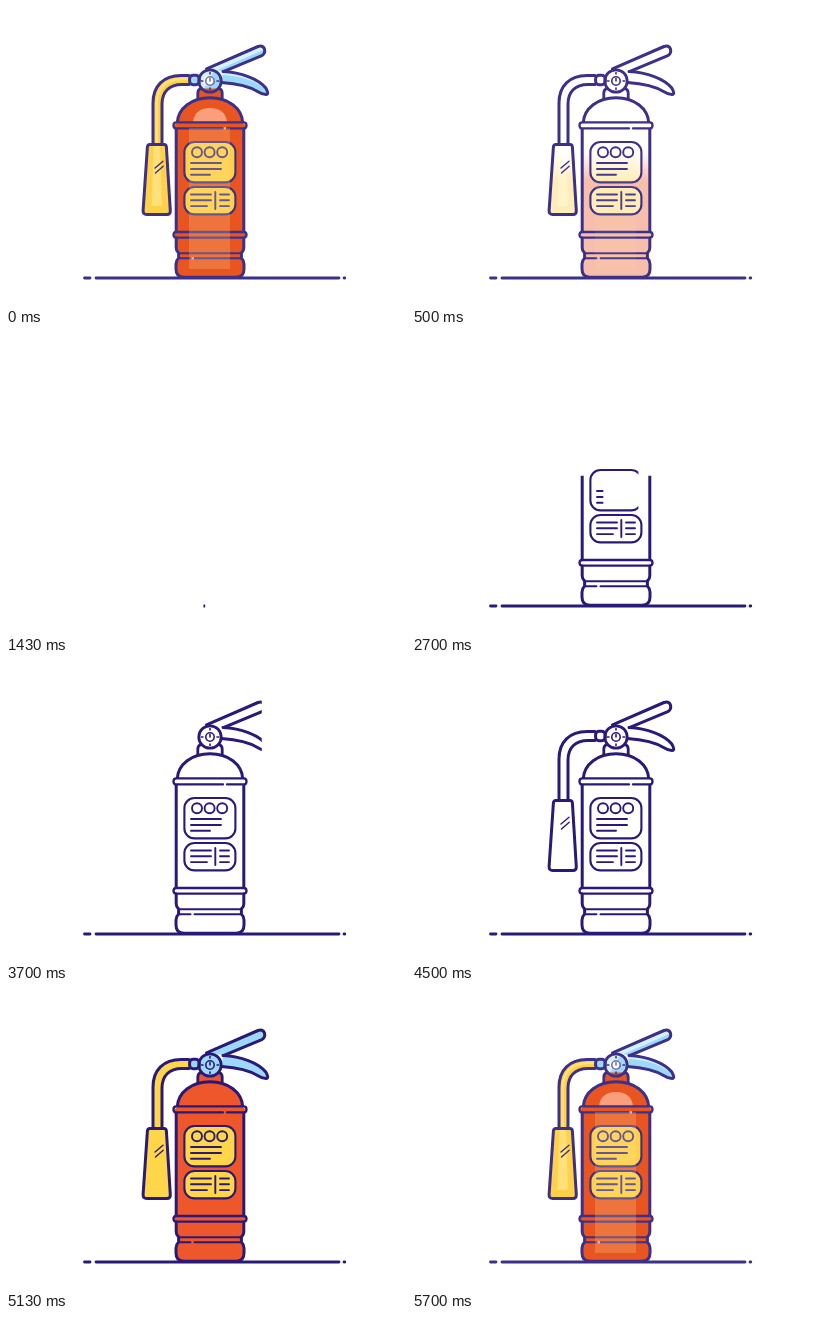
Write an HTML page with a canvas that moves like this. It is 400 by 300 pixels and loops after 7210 ms.

```html
<!DOCTYPE html>
<html lang="en">
<head>
<meta charset="utf-8">
<title>Fire extinguisher</title>
<style>
html, body { margin: 0; width: 100%; height: 100%; overflow: hidden; background: #fff; }
canvas { display: block; width: 100vw; height: 100vh; }
</style>
</head>
<body>
<canvas id="stage" width="400" height="300"></canvas>
<script>
const W = 400, H = 300, LOOP = 7210;
const DARK_INK = [42, 26, 119], SOFT_INK = [60, 48, 136];
const stage = document.getElementById('stage').getContext('2d');

function makeLayer() {
  const c = document.createElement('canvas');
  c.width = W;
  c.height = H;
  return c.getContext('2d');
}
const colorLayer = makeLayer(), lineLayer = makeLayer(), glossLayer = makeLayer();
const layers = [colorLayer, lineLayer, glossLayer];

const path = d => new Path2D(d);
function box(x, y, w, h, r) {
  const p = new Path2D();
  p.roundRect(x, y, w, h, r);
  return p;
}
function ring(x, y, r) {
  const p = new Path2D();
  p.arc(x, y, r, 0, Math.PI * 2);
  return p;
}

const shape = {
  ground: path('M78.5 272H84M90 272H333M338 272H338.8'),
  dome: path('M171.2 117C172 102 186 91.7 204 91.7S236 102 236.8 117'),
  sides: path('M170.2 123V226M237.8 123V226'),
  base: path('M170.2 232V242Q170.2 245 172.6 247V252Q170 254.5 170 258V263Q170 271.3 178 271.3H230Q238 271.3 238 263V258Q238 254.5 235.4 252V247Q237.8 245 237.8 242V232'),
  bandTop: path('M217 122.4H170.2Q167.5 122.4 167.5 119.4T170.2 116.4H237.8Q240.5 116.4 240.5 119.4T237.8 122.4H221'),
  bandLow: box(167.5, 226, 73, 5.6, 2.8),
  seams: path('M173 247.2H235'),
  lowSeam: path('M173 252.2H184.5M188.5 252.2H235'),
  neck: path('M191.8 92V87Q191.8 83.5 195 82.5M216.2 92V87Q216.2 83.5 213 82.5'),
  gauge: ring(204, 75, 11.2),
  dial: ring(204, 75, 4.2),
  ticks: path('M204 75V72.5M195.3 75H197M211 75H212.7M204 66.5V68M204 82V83.5'),
  bar: path('M200.5 62.8L252 40.5Q256.8 38.9 258.4 42.8Q259.8 47.4 255.8 49.6L218 65.3'),
  trigger: path('M217 65.5C235 66.5 252 72.5 259.8 82Q263.5 88.3 260 88.5Q256 88.3 252 85.7C242 79.5 230 77.5 215.5 76.5'),
  collar: box(183.6, 69.2, 9.6, 9.6, 3.5),
  hose: path('M183 69.5H175C157.5 69.5 147 80 147 97V138M183 78.5H176C163 78.5 156 86 156 98V138'),
  nozzle: path('M144 138.4H158Q160.2 138.4 160.4 141L164.3 204.5Q164.5 208.5 161 208.5H140.8Q136.9 208.5 137.1 204.5L141.4 141Q141.6 138.4 144 138.4Z'),
  glare: path('M149 162L157 155.3M149.5 167L157.2 160.3'),
  label1: box(178.4, 136, 51, 40.4, 10),
  label2: box(178.4, 181, 51, 27.4, 10),
  text1: path('M185 157H215M185 163H215M185 168.8H204'),
  text2: path('M185 188.5H205M185 194.3H205M185 200.1H201M214 188.5H223M214 194.3H223M214 200.1H223M209.3 186V203')
};
const dots = [191, 203.6, 216.2].map(x => ring(x, 146.2, 5));

const bodyFill = path('M171 117C172 102 186 92 204 92S236 102 237 117L240 120L238 123V226L240 229L238 232V242L235.4 247V252L238 258V263Q238 271 230 271H178Q170 271 170 263V258L172.6 252V247L170.2 242V232L168 229L170.2 226V123L168 120Z');
const neckFill = path('M191.8 92V87Q191.8 82.5 196 82.5H212Q216.2 82.5 216.2 87V92Z');
const hoseFill = path('M183 69.5H175C157.5 69.5 147 80 147 97V138H156V98C156 86 163 78.5 176 78.5H183Z');

const clamp = v => Math.max(0, Math.min(1, v));
const span = (t, a, b) => clamp((t - a) / (b - a));
const smooth = p => p < .5 ? 2 * p * p : 1 - 2 * (1 - p) * (1 - p);
const mix = (a, b, p) => `rgb(${a.map((v, i) => v + (b[i] - v) * p)})`;

// Piecewise linear value through [time, value] keys.
function along(t, keys) {
  if (t <= keys[0][0]) return keys[0][1];
  for (let i = 1; i < keys.length; i++) {
    const [a, u] = keys[i - 1], [b, v] = keys[i];
    if (t <= b) return u + (v - u) * span(t, a, b);
  }
  return keys[keys.length - 1][1];
}

function clipped(c, x, y, w, h, draw) {
  if (w <= 0 || h <= 0) return;
  c.save();
  c.beginPath();
  c.rect(x, y, w, h);
  c.clip();
  draw();
  c.restore();
}

// Keeps the layer between two alphas, blended from y0 to y1.
function mask(c, y0, y1, top, bottom) {
  const g = c.createLinearGradient(0, y0, 0, y1);
  g.addColorStop(0, `rgba(0,0,0,${top})`);
  g.addColorStop(1, `rgba(0,0,0,${bottom})`);
  c.save();
  c.globalCompositeOperation = 'destination-in';
  c.fillStyle = g;
  c.fillRect(0, 0, W, H);
  c.restore();
}

function erase(c, p) {
  const front = 38 + 260 * Math.pow(p, 1.35);
  if (p > 0) mask(c, front - 30, front, 0, 1 - p);
}

function drawLines(c, t) {
  const ink = (width, ...names) => {
    c.lineWidth = width;
    for (const n of names) c.stroke(shape[n]);
  };
  const right = (a, b, x0, x1, draw) => {
    const p = span(t, a, b);
    if (p > 0) clipped(c, 0, 0, x0 + (x1 - x0) * p, H, draw);
  };
  c.strokeStyle = mix(DARK_INK, SOFT_INK, span(t, 5200, 5700));
  c.lineCap = c.lineJoin = 'round';

  const half = 143 * smooth(span(t, 1395, 2050));
  clipped(c, 198.3 - half, 260, half * 2, 30, () => ink(2.8, 'ground'));

  const level = along(t, [[1900, 274], [2230, 235], [2700, 142], [2970, 100], [3080, 88]]);
  clipped(c, 0, level, W, H, () => {
    c.save();
    c.lineCap = 'butt';
    ink(3, 'sides', 'dome');
    c.restore();
    ink(3, 'base');
    ink(2.3, 'bandTop', 'bandLow');
  });
  right(2270, 2480, 170, 240, () => ink(2, 'seams', 'lowSeam'));
  right(2380, 2560, 176, 232, () => ink(2.1, 'label2'));
  right(2480, 2660, 183, 226, () => ink(1.9, 'text2'));
  right(2530, 2720, 176, 232, () => ink(2.1, 'label1'));
  right(2650, 2880, 184, 217, () => ink(1.9, 'text1'));
  right(2760, 2965, 184, 224, () => {
    c.lineWidth = 1.9;
    dots.forEach(d => c.stroke(d));
  });

  const neckTop = 94 - 32 * span(t, 3010, 3330);
  clipped(c, 180, neckTop, 50, 94 - neckTop, () => {
    ink(2.8, 'neck', 'gauge');
    ink(1.6, 'dial', 'ticks');
  });
  right(3270, 3770, 198, 265, () => ink(3, 'bar', 'trigger'));

  const left = 195 - 51 * span(t, 3730, 4010);
  clipped(c, left, 60, 195 - left, 38, () => ink(3, 'collar', 'hose'));
  const down = 98 + 113 * span(t, 4000, 4330);
  clipped(c, 130, 98, 50, down - 98, () => ink(3, 'hose', 'nozzle'));
  right(4310, 4430, 147, 159, () => ink(1.4, 'glare'));
}

function drawColors(c, shade) {
  const fill = (color, ...paths) => {
    c.fillStyle = color;
    paths.forEach(p => c.fill(p));
  };
  const inside = (p, draw) => {
    c.save();
    c.clip(p);
    draw();
    c.restore();
  };
  const { bar, trigger, collar, gauge, nozzle, label1, label2 } = shape;
  fill('#ee572b', bodyFill, neckFill);
  fill('#ffd54a', label1, label2, hoseFill, nozzle);
  fill('#9cd8f8', bar, trigger, collar, gauge);
  if (!shade) return;

  c.globalAlpha = shade;
  fill('#e95521', bodyFill, neckFill);
  fill('#f99f7c', path('M187 116C188 107 194 102 204 102S220 107 221 116Z'));
  fill('#ffd048', label1, label2, hoseFill, nozzle);
  inside(hoseFill, () => {
    c.strokeStyle = '#ffe07a';
    c.lineWidth = 2.5;
    c.stroke(path('M183 73H176C160 73 150.8 82 150.8 98V138'));
  });
  inside(nozzle, () => fill('#ffe07a', path('M147.5 139H154L156 200H145.5Z')));
  inside(bar, () => fill('#d8f1ff', path('M200 61L254 38L257 44L205 67Z')));
  inside(trigger, () => fill('#d3efff', path('M217 64C238 66 254 73 262 85C248 74 235 70 217 69Z')));
  inside(gauge, () => fill('#d8f1ff', path('M192 75L201 63H209L196 86Z')));
  fill('#ffffff', ring(203, 74.5, 4.5));
  c.globalAlpha = 1;
}

// Translucent light that lies over the outlines.
function drawGloss(c, shade) {
  c.globalAlpha = shade;
  c.fillStyle = 'rgba(255,225,165,.22)';
  c.fillRect(183, 122, 41, 141);
  c.fillStyle = 'rgba(255,255,255,.3)';
  c.fill(ring(203, 74.5, 6));
  c.fillStyle = 'rgba(255,190,160,.7)';
  c.fillRect(217.5, 121, 2.5, 2.5);
  c.fillRect(185.5, 251, 2.5, 2.5);
  c.globalAlpha = 1;
}

function render(t) {
  layers.forEach(c => c.clearRect(0, 0, W, H));

  const leaving = t < 1395;
  drawLines(lineLayer, leaving ? LOOP : t);
  if (leaving) erase(lineLayer, span(t, 775, 1390));

  if (t < 770) {
    const p = span(t, 60, 770);
    drawColors(colorLayer, 1);
    drawGloss(glossLayer, 1);
    erase(colorLayer, p);
    erase(glossLayer, p);
  } else if (t > 4440) {
    const p = span(t, 4440, 5170);
    const shade = span(t, 5180, 5700);
    drawColors(colorLayer, shade);
    drawGloss(glossLayer, shade);
    if (p < 1) {
      const front = 42 + 360 * (1 - (1 - p) * (1 - p));
      mask(colorLayer, front - 130, front, Math.min(1, p * 1.12), 0);
    }
  }

  stage.fillStyle = '#fff';
  stage.fillRect(0, 0, W, H);
  layers.forEach(c => stage.drawImage(c.canvas, 0, 0));
}

const start = performance.now();
function tick() {
  render((performance.now() - start) % LOOP);
  requestAnimationFrame(tick);
}
tick();
</script>
</body>
</html>
```
